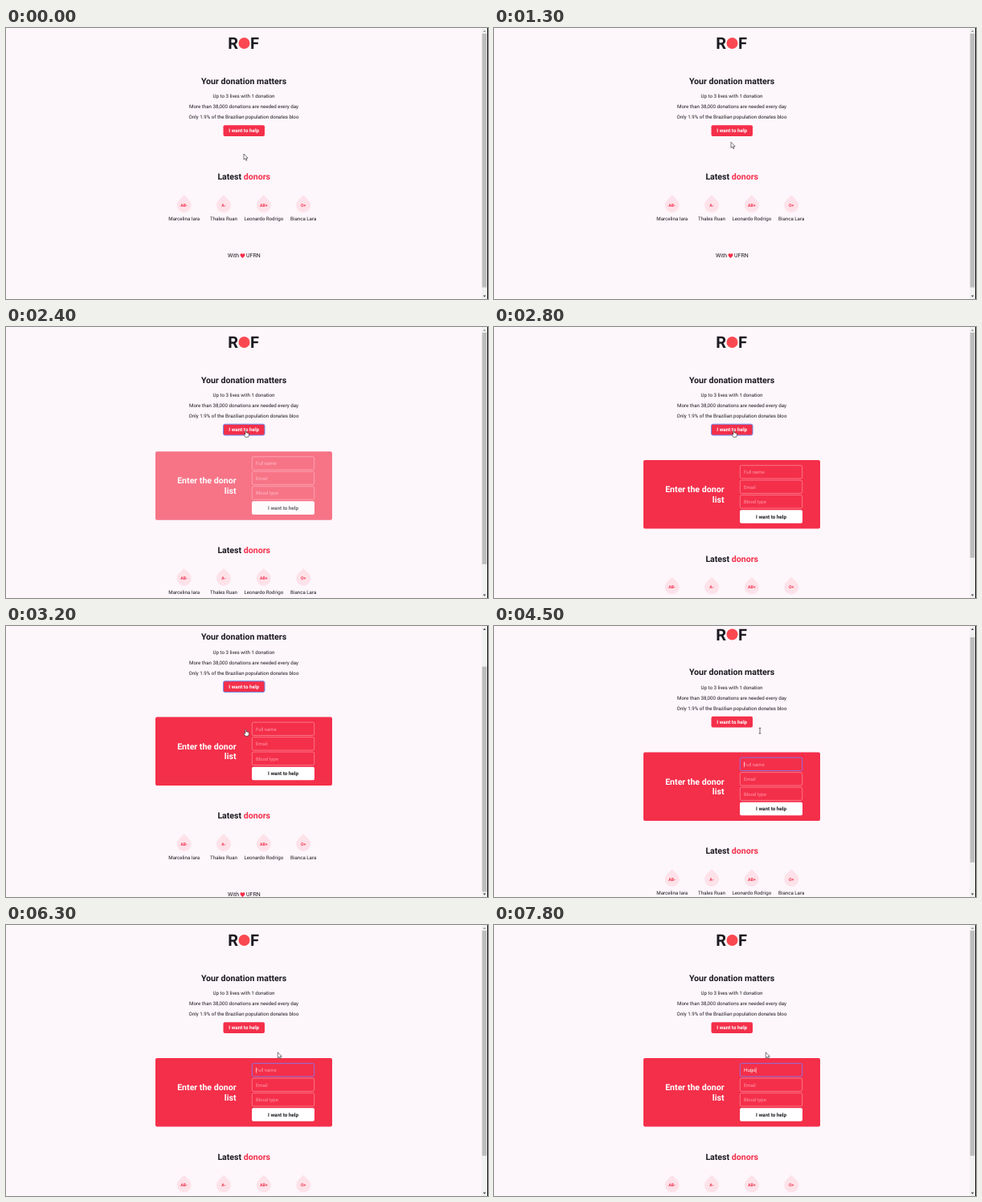
Animation of 600 by 338 pixels, one loop 8000 ms. Source, as an HTML page:

```html
<!DOCTYPE html>
<html lang="en">
<head>
<meta charset="utf-8">
<title>Donation page</title>
<style>
  html, body { margin: 0; width: 100%; height: 100%; overflow: hidden; background: #fdf6fb; }
  svg { display: block; width: 100vw; height: 100vh; }
  text { font: 6.17px Roboto, sans-serif; fill: #1b1a20; text-rendering: geometricPrecision; }
  .mid { text-anchor: middle; }
  .end { text-anchor: end; }
  .title { font-size: 10.6px; font-weight: 700; }
  .brand { font-size: 20px; font-weight: 700; }
  .action { font-size: 6.3px; font-weight: 700; }
  .blood { font-size: 5.2px; font-weight: 700; }
  .footer { font-size: 7px; }
  .hint { font-size: 5.9px; fill: #ff9dab; }
  .red { fill: #f42f4a; }
  .white { fill: #fff; }
  .drop { fill: #fde2e9; }
  .field { fill: none; stroke: #ffa3b0; stroke-width: .6; }
  .pointer { fill: #fff; stroke: #222; stroke-width: .6; stroke-linejoin: round; }
</style>
</head>
<body>
<svg viewBox="0 0 600 338">
  <rect width="600" height="338" fill="#fdf6fb"/>
  <g id="page">
    <text class="brand" x="276.3" y="26">R</text>
    <circle cx="296.5" cy="19" r="7" fill="#fb4850"/>
    <text class="brand end" x="315" y="26">F</text>

    <text class="title mid" x="296" y="69.7">Your donation matters</text>
    <text class="mid" x="296" y="87.1">Up to 3 lives with 1 donation</text>
    <text class="mid" x="296" y="100.3">More than 38,000 donations are needed every day</text>
    <text class="mid" x="296" y="113.4">Only 1.9% of the Brazilian population donates bloo</text>
    <rect id="helpButton" class="red" x="270.5" y="121.2" width="51.5" height="13.8" rx="2"/>
    <text class="action white mid" x="296.2" y="130.3">I want to help</text>

    <g id="form">
      <rect class="red" x="186" y="166" width="220" height="85.5" rx="2"/>
      <text class="title white end" x="286.5" y="206">Enter the donor</text>
      <text class="title white end" x="286.5" y="218.7">list</text>
      <g id="fields"></g>
      <text id="value" class="white" x="311" y="183.2"></text>
      <rect id="caret" class="white" y="177.8" width=".6" height="6.8"/>
      <rect class="white" x="306" y="228.2" width="78" height="16.6" rx="2"/>
      <text class="action mid" x="345" y="238.7">I want to help</text>
    </g>

    <g id="lower">
      <text class="title mid" x="296.2" y="189.3">Latest <tspan class="red">donors</tspan></text>
      <g id="donors"></g>
      <text class="footer" x="276" y="286.4">With</text>
      <path class="red" d="M294.5 287C290 283.6 291.6 281 293.2 281.2Q294.2 281.4 294.5 282.3Q294.8 281.4 295.8 281.2C297.4 281 299 283.6 294.5 287Z"/>
      <text class="footer" x="299" y="286.4">UFRN</text>
    </g>
  </g>

  <rect x="592" width="7" height="338" fill="#f1f1f1"/>
  <rect id="thumb" x="592.7" width="5.6" fill="#bdbdbd"/>
  <path id="upArrow" d="M593.9 5L595.6 2.8L597.3 5Z"/>
  <path d="M593.9 333.5L595.6 335.7L597.3 333.5Z" fill="#444"/>
  <rect x="599" width="1" height="338" fill="#151515"/>

  <g id="cursor">
    <path id="arrow" class="pointer" d="M0 0V7.2L1.7 5.7L2.9 8.3L4 7.8L2.9 5.3H5.1Z"/>
    <path id="hand" class="pointer" d="M-.6 .6Q0-.5 .6 .6V3Q1.3 2.5 1.8 3.2Q2.5 2.8 2.9 3.5Q3.8 3.2 3.9 4.2V6L3 8.3H-.6L-2.5 5.2Q-2.3 4.1-.6 5.2Z"/>
    <path id="beam" d="M-1.3-3.4H1.3M0-3.4V3.4M-1.3 3.4H1.3" stroke="#333" stroke-width=".7"/>
  </g>
</svg>
<script>
const LOOP = 8000, STEP = 100;
const FORM_SPACE = 103.5, FORM_DROP = 31, PAGE_HEIGHT = 390;
const NAME = "Hugo", KEY_TIMES = [7200, 7500, 7600, 7800];
const el = Object.fromEntries([...document.querySelectorAll("[id]")].map(e => [e.id, e]));

el.fields.innerHTML = ["Full name", "Email", "Blood type"].map((label, i) => `
  <rect class="field" x="306.3" y="${172.6 + 18.5 * i}" width="77.4" height="16.4" rx="2"/>
  <text class="hint" x="311" y="${183.2 + 18.5 * i}">${label}</text>`).join("");

el.donors.innerHTML = [
  [221.7, "AB-", "Marcelina Iara"], [271, "A-", "Thales Ruan"],
  [320.8, "AB+", "Leonardo Rodrigo"], [370.2, "O+", "Bianca Lara"]
].map(([x, blood, name]) => `
  <path class="drop" transform="translate(${x} 221) rotate(45)" d="M-9-9H0A9 9 0 1 1-9 0Z"/>
  <text class="blood red mid" x="${x}" y="222.8">${blood}</text>
  <text class="mid" x="${x}" y="240.3">${name}</text>`).join("");

const nameField = el.fields.querySelector("rect");
const nameHint = el.fields.querySelector("text");

const reveal = [[2200, 0], [2300, .25], [2400, .65], [2500, .86], [2600, .96], [2700, 1]];
const scroll = [[2900, 0], [3000, 12], [3100, 38], [3200, 52.5], [4300, 52.5],
  [4400, 31], [4500, 8.5], [4600, 1.5], [4700, 0]];
const cursorX = [[900, 296], [1200, 290], [1500, 305], [1800, 298.5],
  [3600, 298.5], [4200, 331], [4600, 331], [5200, 338.3]];
const cursorY = [[900, 157], [1200, 147], [1500, 133], [1800, 129],
  [3600, 129], [4200, 130.7], [4600, 130.7], [5200, 158.7]];

// Linear interpolation through [time, value] points, held at both ends.
function track(points, t) {
  const i = points.findIndex(p => p[0] >= t);
  if (i < 0) return points.at(-1)[1];
  if (i === 0) return points[0][1];
  const [t0, a] = points[i - 1], [t1, b] = points[i];
  return a + (b - a) * (t - t0) / (t1 - t0);
}

const within = (t, from, to) => t >= from && t < to;
const show = (node, on) => node.setAttribute("visibility", on ? "visible" : "hidden");
const move = (node, x, y) => node.setAttribute("transform", `translate(${x} ${y})`);

function drawScrollbar(offset, space) {
  const height = Math.max(346, PAGE_HEIGHT - FORM_SPACE + space);
  el.thumb.setAttribute("y", 7 + offset * 324 / height);
  el.thumb.setAttribute("height", 324 * 338 / height);
  el.upArrow.setAttribute("fill", offset > 0 ? "#444" : "#999");
}

function drawNameField(t) {
  const focused = t >= 4200;
  const typed = NAME.slice(0, KEY_TIMES.filter(k => t >= k).length);
  nameField.style.stroke = focused ? "#8476f0" : "";
  nameField.style.strokeWidth = focused ? .9 : "";
  show(nameHint, !typed);
  el.value.textContent = typed;
  el.caret.setAttribute("x", 311 + (typed ? el.value.getComputedTextLength() : 0));
  const blinkedOff = within(t, 4700, 5200) || within(t, 5700, 6300) || within(t, 6800, 7200);
  show(el.caret, focused && !blinkedOff);
}

function drawCursor(t) {
  const x = track(cursorX, t), y = track(cursorY, t);
  const hand = within(t, 1500, 3400);
  const beam = within(t, 3600, 4700) && x > 306;
  move(el.cursor, x, y);
  show(el.hand, hand);
  show(el.beam, beam);
  show(el.arrow, !hand && !beam);
}

function draw(t) {
  const shown = track(reveal, t), offset = track(scroll, t);
  const space = t < 2200 ? 0 : FORM_SPACE - FORM_DROP * (1 - shown);
  move(el.page, 0, -offset);
  move(el.form, 0, space - FORM_SPACE);
  el.form.setAttribute("opacity", shown);
  move(el.lower, 0, space);
  el.helpButton.setAttribute("stroke", within(t, 2200, 4200) ? "#6f8ff0" : "none");
  drawScrollbar(offset, space);
  drawNameField(t);
  drawCursor(t);
}

function tick(now) {
  draw(Math.floor(now % LOOP / STEP) * STEP);
  requestAnimationFrame(tick);
}
draw(0);
requestAnimationFrame(tick);
</script>
</body>
</html>
```
